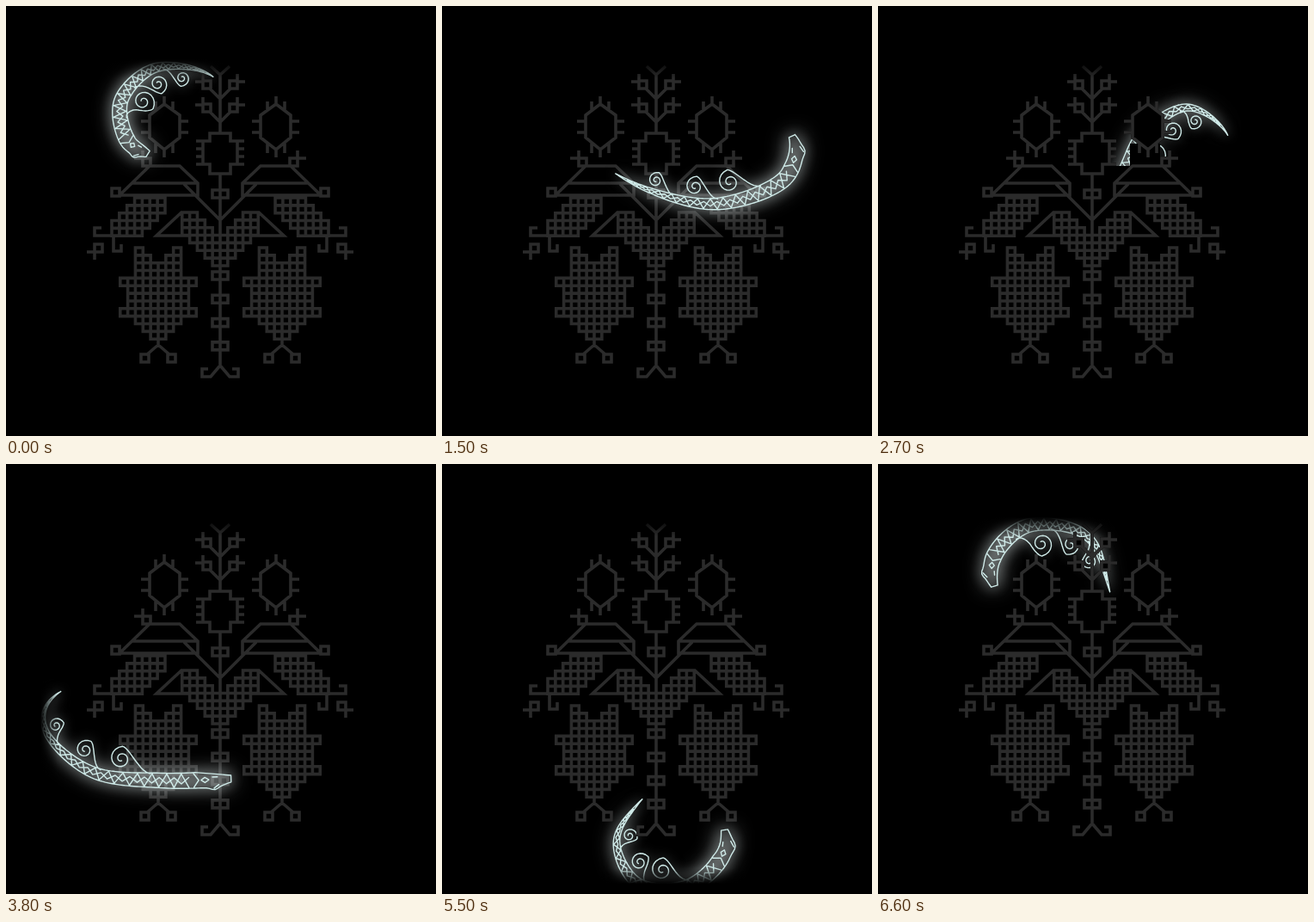
Animation, 500 px wide and 500 px high, one loop 6.7 s. Source, as an HTML page with a canvas:

```html
<!DOCTYPE html>
<html lang="en">
<head>
<meta charset="utf-8">
<title>Glowing serpent around a stitched tree</title>
<style>
html, body { margin: 0; width: 100%; height: 100%; overflow: hidden; background: #000; }
canvas { display: block; width: 500px; height: 500px; }
</style>
</head>
<body>
<canvas id="stage" width="500" height="500"></canvas>
<script>
const SIZE = 500, LOOP = 6700, STEP = 100;
const stage = document.getElementById('stage').getContext('2d');

function layer() {
  const c = document.createElement('canvas');
  c.width = c.height = SIZE;
  return c.getContext('2d');
}

// ---------- embroidered tree: left half, then mirrored ----------
const CELL = 8.85;
const box = (x, y, w = 9, h = 9) => `M${x},${y}h${w}v${h}h${-w}z`;

// stitches every cell of the columns and rows that inside(column, row) accepts
function grid(x, y, inside) {
  let d = '';
  for (let r = 0; r < 12; r++)
    for (let c = -5; c < 10; c++)
      if (inside(c, r)) d += box(x + c * CELL, y + r * CELL, CELL, CELL);
  return d;
}

const leaf = (c, r) => r < 5 && c >= Math.max(0, 3 - r) && c < Math.min(7, 8 - r);
const heart = (c, r) => c >= Math.max(0, r - 2) && c < Math.min(5, r + 2);
function urn(c, r) {
  const off = Math.abs(c + .5);
  const half = r % 4 === 0 && r ? 5 : r < 4 ? 3 : r < 8 ? 4 : 12 - r;
  return off < half && off > 2 - r;
}

const repeat = (n, fn) => Array.from({ length: n }, (_, i) => fn(i)).join('');

const half = [
  'M238,70L249,80M249,80V148',
  repeat(2, i => `M249,${108 + 27 * i}l-12,-12` + box(229, 87 + 27 * i) + `M220,${88 + 27 * i}h9M229,${88 + 27 * i}v-9`),
  'M249,148H237V157H229V184H237V195H249',
  repeat(4, i => `M221,${157 + 9 * i}h8`),
  'M184,114L202,127V153L184,167L167,153V127Z',
  'M184,105v9M184,167v9',
  repeat(2, i => `M${174 + 20 * i},111v10m0,39v11M157,${134 + 13 * i}h10m35,0h10`),
  'M149,177h10M159,177v-9', box(159, 177),
  'M132,220L167,186H202L223,206V220ZM146,206H223', box(123, 212),
  'M207,207L249,249M249,195V418',
  grid(123, 223, leaf),
  'M111,258h-8v9h31M125,267v18h9v-8', box(103, 277), 'M94,286h9M103,286v9',
  'M204,240L175,267H212', grid(204.75, 240, heart),
  box(240, 214, 18), repeat(4, i => box(240, 309 + 27.3 * i, 18)),
  'M249,418L238,431H228V422H235',
  grid(177, 281, urn),
  'M177,386V394M163,406L177,394L191,406', box(157, 405), box(188, 405)
].join('');

const flip = new DOMMatrix([-1, 0, 0, 1, 498, 0]);
function mirrored(d) {
  const path = new Path2D(d);
  path.addPath(new Path2D(d), flip);
  return path;
}

const tree = mirrored(half);
const treeLayer = layer();
treeLayer.strokeStyle = '#2b2b2b';
treeLayer.lineWidth = 3.6;
treeLayer.stroke(tree);

// everything that hides the serpent while it swims behind the tree
const mask = layer();
mask.lineWidth = 4;
mask.stroke(tree);
mask.fill(tree);
mask.fill(mirrored('M249,186H151L123,212L101,260V287L146,310V358H249ZM170,160h35v28h-35z'));

// ---------- closed route ----------
const route = [
  165,172, 238,213, 320,230, 397,202, 407,151, 360,118, 308,150, 270,212,
  165,236, 63,265, 46,310, 100,358, 180,368, 262,366, 345,362, 425,331,
  450,288, 420,260, 360,285, 290,340, 228,395, 203,440, 228,488, 285,492,
  326,455, 325,405, 300,300, 270,150, 243,84, 177,71, 135,107, 139,152
];
const N = route.length / 2;
const mod = (a, n) => ((a % n) + n) % n;
const spline = (a, b, c, d, t) =>
  b + t * (c - a + t * (2 * a - 5 * b + 4 * c - d + t * (3 * (b - c) + d - a))) / 2;

function routeAt(u) {
  const i = Math.floor(u);
  return [0, 1].map(c =>
    spline(...[-1, 0, 1, 2].map(o => route[2 * mod(i + o, N) + c]), u - i));
}

// trail: about one entry per pixel of length
const trail = [];
let total = 0, previous = routeAt(0);
for (let u = 0; u < N; u += .004) {
  const [x, y] = routeAt(u);
  total += Math.hypot(x - previous[0], y - previous[1]);
  previous = [x, y];
  if (total >= trail.length) trail.push({ x, y, u });
}
total = trail.length;

const spot = i => trail[mod(i, total)];
const lengthAt = u => Math.floor(u / N) * total + trail.findLastIndex(p => p.u <= mod(u, N));

// position and direction s pixels along the route
function frame(s) {
  const i = Math.floor(s), f = s - i;
  const a = spot(i), b = spot(i + 1), p = spot(i - 4), q = spot(i + 5);
  const dx = q.x - p.x, dy = q.y - p.y, d = Math.hypot(dx, dy);
  return { x: a.x + (b.x - a.x) * f, y: a.y + (b.y - a.y) * f, dx: dx / d, dy: dy / d, u: a.u };
}

// point moved forward and to the left of a frame
const offset = (o, forward, left) => ({
  x: o.x + o.dx * forward + o.dy * left,
  y: o.y + o.dy * forward - o.dx * left,
  u: o.u
});

// ---------- timing: ms, then head and tail in route points ----------
const keys = [
  [0, 0, -3.95], [1500, 4, .55], [2700, 7.5, 4.03], [3800, 13, 9],
  [4800, 19.1, 14.8], [5500, 24.7, 19.9], [6600, 30.75, 27.02]
].map(([t, head, tail]) => [t, lengthAt(head), lengthAt(tail)]);
const K = keys.length;
const key = (i, c) => keys[mod(i, K)][c] + Math.floor(i / K) * (c ? total : LOOP);
const rate = (i, c) => (key(i + 1, c) - key(i, c)) / (key(i + 1, 0) - key(i, 0));

function slope(i, c) {
  const a = rate(i - 1, c), b = rate(i, c);
  return 2 * a * b / (a + b);
}

function position(t, c) {
  const i = keys.findLastIndex(k => k[0] <= t);
  const span = key(i + 1, 0) - key(i, 0), f = (t - key(i, 0)) / span, g = 1 - f;
  return key(i, c) * g * g * (1 + 2 * f) + key(i + 1, c) * f * f * (3 - 2 * f)
    + span * f * g * (slope(i, c) * g - slope(i + 1, c) * f);
}

// ---------- serpent, f runs from tail 0 to head 1 ----------
const behindTree = [[5.2, 8.9], [17.1, 21.5], [25, 28.5]];
const hidden = u => +behindTree.some(([a, b]) => u > a && u < b);
const width = f => 9.3 * (1 - (1 - f) ** 2);
const back = f => width(f) - 5.3 * Math.max(0, (f - .86) / .14);
const chin = f => 2.5 * Math.exp(-(((f - .93) / .02) ** 2));
const belly = f => -width(f) - chin(f) + 5.5 * Math.max(0, (f - .94) / .06);
const steps = (n, fn) => Array.from({ length: n + 1 }, (_, i) => fn(i / n, i));

// a wave crest that leaves the back and rolls up into a spiral
function curl(f, size, tail, length) {
  const s = tail + f * length, base = frame(s), edge = width(f);
  const crest = steps(12, t => {
    const x = 30 * size * (1 - t) ** 1.3;
    const y = edge + 25 * size * Math.sin(t * Math.PI / 2) ** 1.5;
    const bent = offset(frame(s + x), 0, y), stiff = offset(base, x, y);
    return { x: bent.x + (stiff.x - bent.x) * t, y: bent.y + (stiff.y - bent.y) * t, u: base.u };
  });
  const spiral = steps(30, t => {
    const a = Math.PI * (.5 + 3.1 * t), r = (12 - 10 * t ** .75) * size;
    return offset(base, r * Math.cos(a), edge + 13 * size + r * Math.sin(a));
  });
  return [...crest, ...spiral];
}

function figure(tail, length) {
  const at = (f, h) => offset(frame(tail + f * length), 0, h);
  const zigzag = (k, phase) => steps(26, (t, i) => {
    const f = .06 + .77 * t;
    return at(f, width(f) * k * ((i + phase) % 2 ? 1 : -1));
  });
  return [
    steps(90, f => at(f, back(f))),
    steps(90, f => at(f, belly(f))),
    [at(1, back(1)), at(1, belly(1))],
    zigzag(.9, 0),
    zigzag(.4, 1),
    [at(.85, -8), at(.87, 0), at(.85, 8)],
    steps(4, (t, i) => at(.895 - .015 * Math.cos(i * Math.PI / 2), 3 * Math.sin(i * Math.PI / 2))),
    [at(.925, 3), at(.945, 3)],
    [at(.93, -10), at(.95, -6)],
    ...steps(2, t => curl(.18 + .37 * t, .8 + .4 * t, tail, length))
  ];
}

const front = layer(), behind = layer();

function paint(ctx, lines, body) {
  ctx.globalCompositeOperation = 'source-over';
  ctx.clearRect(0, 0, SIZE, SIZE);
  ctx.fillStyle = 'rgba(235,245,245,.55)';
  ctx.filter = 'blur(11px)';
  ctx.fill(body);
  ctx.filter = 'none';
  ctx.lineCap = ctx.lineJoin = 'round';
  ctx.strokeStyle = '#cfeae8';
  ctx.lineWidth = 1.4;
  ctx.shadowColor = 'rgba(235,250,250,.5)';
  ctx.shadowBlur = 14;
  ctx.stroke(lines);
  ctx.shadowBlur = 0;
}

// the scene darkens towards the four sides of its frame
function fadeEdge(x0, y0, x1, y1) {
  const fade = stage.createLinearGradient(x0, y0, x1, y1);
  fade.addColorStop(0, '#000');
  fade.addColorStop(1, 'rgba(0,0,0,0)');
  stage.fillStyle = fade;
  stage.fillRect(0, 0, SIZE, SIZE);
}

function draw(t) {
  const tail = position(t, 2), length = position(t, 1) - tail;
  const lines = [new Path2D(), new Path2D()], body = [new Path2D(), new Path2D()];

  for (const points of figure(tail, length)) {
    let side = -1;
    points.forEach((p, i) => {
      if (!i) return;
      const now = hidden(p.u);
      if (now !== side) lines[now].moveTo(points[i - 1].x, points[i - 1].y);
      lines[now].lineTo(p.x, p.y);
      side = now;
    });
  }
  for (let i = 0; i < 70; i++) {
    const a = frame(tail + i / 70 * length), b = frame(tail + (i + 1) / 70 * length);
    const w = width(i / 70), v = width((i + 1) / 70), path = body[hidden(a.u)];
    [offset(a, 0, w), offset(b, 0, v), offset(b, 0, -v), offset(a, 0, -w)]
      .forEach((p, k) => k ? path.lineTo(p.x, p.y) : path.moveTo(p.x, p.y));
    path.closePath();
  }

  paint(front, lines[0], body[0]);
  paint(behind, lines[1], body[1]);
  behind.globalCompositeOperation = 'destination-out';
  behind.drawImage(mask.canvas, 0, 0);

  stage.fillStyle = '#000';
  stage.fillRect(0, 0, SIZE, SIZE);
  for (const ctx of [treeLayer, behind, front]) stage.drawImage(ctx.canvas, 0, 0);
  fadeEdge(0, 62, 0, 84);
  fadeEdge(0, 488, 0, 470);
  fadeEdge(40, 0, 60, 0);
  fadeEdge(461, 0, 441, 0);
}

const start = performance.now();
let shown = -1;
function tick() {
  const t = Math.floor(((performance.now() - start) % LOOP) / STEP) * STEP;
  if (t !== shown) draw(shown = t);
  requestAnimationFrame(tick);
}
tick();
</script>
</body>
</html>
```
